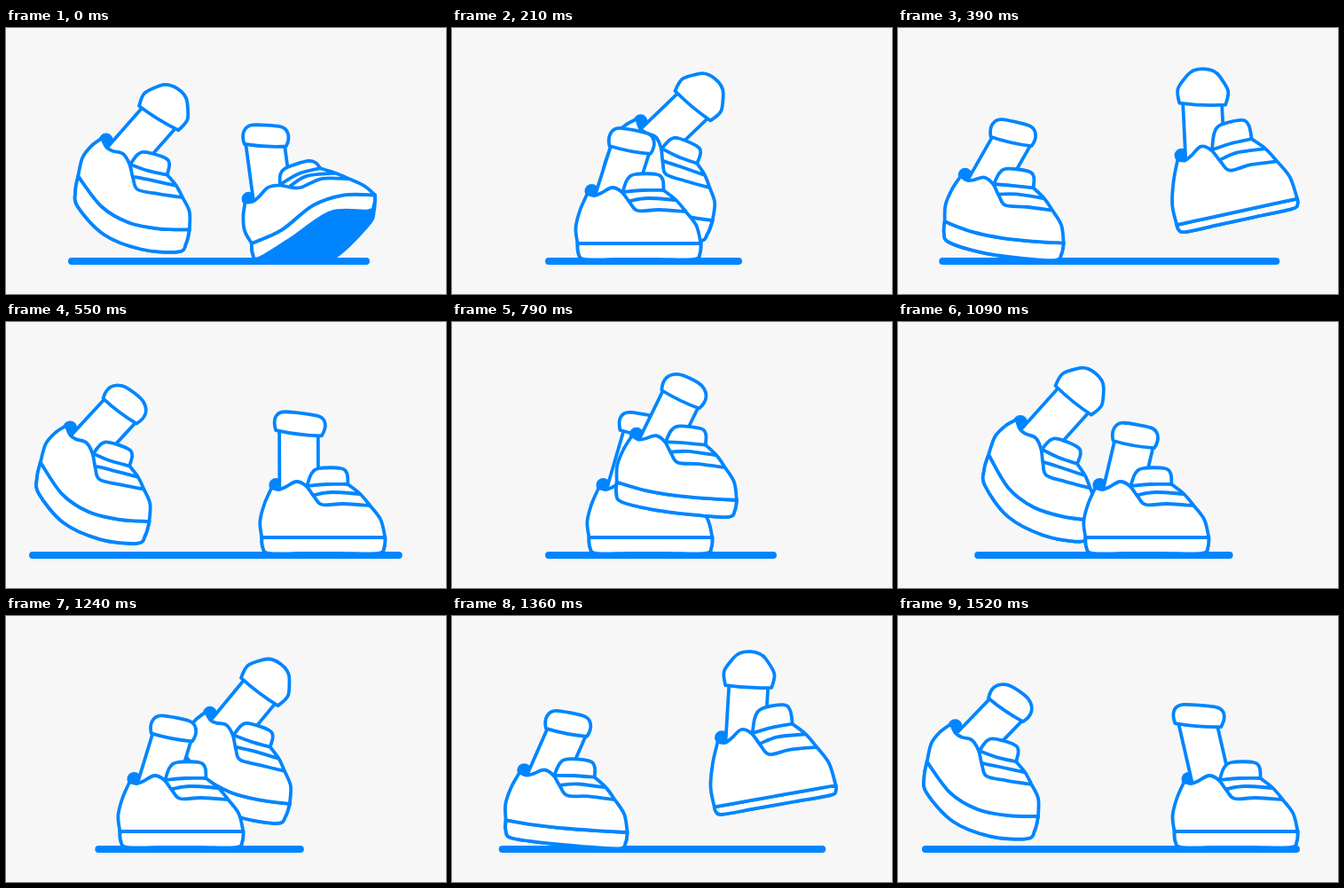
An HTML page that plays this animation: 496 by 300 pixels, repeating every 1.55 s.

```html
<!DOCTYPE html>
<html lang="en">
<head>
<meta charset="utf-8">
<title>Walking shoes</title>
<style>
html, body { margin: 0; width: 100%; height: 100%; overflow: hidden; background: #f7f7f7; }
svg { display: block; width: 100%; height: 100%; }
</style>
</head>
<body>
<svg id="stage" viewBox="0 0 496 300" fill="none" stroke="#0085ff" stroke-width="3.8" stroke-linecap="round" stroke-linejoin="round"></svg>
<script>
const LOOP = 1550, CYCLE = 1000, INK = '#0085ff';
const LENGTH = 140, SOLE = 18, LEG = 44;
const svg = document.getElementById('stage');

const mix = (a, b, k) => a + (b - a) * k;
const ramp = (x, a, b) => {
  const k = Math.min(1, Math.max(0, (x - a) / (b - a)));
  return k * k * (3 - 2 * k);
};

// One flat shoe, heel at the left, ground at y = 0.
const SHOE = {
  heel: [[1, -18], [-1, -36], [4, -56], [12, -74]],
  collar: [[12, -74], [20, -72], [28, -75], [40, -81], [51, -76]],
  throat: [[51, -76], [60, -64], [69, -55], [93, -56], [123, -54]],
  lace: [[60, -66], [80, -69], [112, -67]],
  vamp: [[51, -76], [74, -78], [98, -78]],
  toe: [[98, -78], [112, -67], [123, -54], [135, -38], [140, -18]],
  tongue: [[52, -76], [57, -90], [66, -96], [90, -96], [97, -90], [98, -78]],
  seam: [[1, -18], [35, -18], [70, -18], [105, -18], [140, -18]],
  edge: [[2, -7], [9, 0], [45, 0], [90, 0], [132, 0], [139, -7]],
  ankle: [[17, -77], [21, -73]]
};

// Toe x, y, tilt, then cuff x, y, tilt, over one stride.
const GAIT = [
  [0, 416, 243, 0, 269, 131, 3],
  [30, 395, 243, 0, 262, 130, 5],
  [90, 351, 243, 0, 243, 134, 10],
  [210, 281, 243, 0, 178, 133, 11],
  [290, 246, 243, 0, 142, 131, 11],
  [360, 198, 244, 3, 106, 127, 11],
  [520, 158, 226, 0, 102, 93, 34],
  [590, 172, 224, 6, 129, 81, 39],
  [710, 245, 217, 7, 203, 80, 40],
  [790, 320, 201, 3, 236, 77, 26],
  [860, 384, 191, -10, 260, 87, 3],
  [940, 418, 200, -14, 278, 107, 2]
];
const GROUND = [
  [0, 74, 406], [90, 90, 374], [210, 109, 323], [360, 57, 417],
  [520, 31, 449], [550, 30, 443], [790, 109, 362]
];

// Monotone cubic through cyclic keys.
function sample(keys, t) {
  const n = keys.length;
  const at = (j, c) => keys[(j + n) % n][c] + (c ? 0 : Math.floor(j / n) * CYCLE);
  let i = n - 1;
  while (keys[i][0] > t) i--;
  const span = at(i + 1, 0) - at(i, 0), k = (t - at(i, 0)) / span;
  const ease = k * k * (3 - 2 * k);
  return keys[0].slice(1).map((_, m) => {
    const c = m + 1;
    const slope = j => (at(j + 1, c) - at(j, c)) / (at(j + 1, 0) - at(j, 0));
    const tangent = j => {
      const a = slope(j - 1), b = slope(j);
      return a * b > 0 ? 2 * a * b / (a + b) : 0;
    };
    return mix(at(i, c), at(i + 1, c), ease)
      + span * k * (1 - k) * ((1 - k) * tangent(i) - k * tangent(i + 1));
  });
}

// Moves from local to stage coordinates.
function frame(x, y, deg) {
  const c = Math.cos(deg * Math.PI / 180), s = Math.sin(deg * Math.PI / 180);
  return (u, v) => [x + u * c - v * s, y + u * s + v * c];
}

// bend: heel peels up; roll: toe lifts and shows the tread; tall: upper stretches.
function warp([u, v], { bend, roll, tall }, under) {
  const h = -v - SOLE, up = Math.max(h, 0), down = Math.max(-h, 0);
  const k = 1 - u / LENGTH, k3 = k * k * k;
  const front = ramp(u, 0, 100), rise = under ? ramp(u, 100, 150) : front;
  return [
    u + bend * (.25 * h * (1 + .4 * k) + 14 * k3) + up * (.1 * tall - .33 * roll),
    v - bend * (63 * k3 - .4 * down)
      - roll * (55 * rise - up * (.2 + .3 * front))
      - tall * (.28 * up + .45 * down)
  ];
}

const fmt = p => p[0].toFixed(2) + ' ' + p[1].toFixed(2);
const poly = pts => 'M' + pts.map(fmt).join('L');

// Smooth curve through points; with join it continues the path before it.
function curve(pts, join) {
  let d = (join ? 'L' : 'M') + fmt(pts[0]);
  for (let i = 0; i < pts.length - 1; i++) {
    const a = pts[i - 1] || pts[i], b = pts[i], c = pts[i + 1], e = pts[i + 2] || c;
    d += 'C' + fmt([b[0] + (c[0] - a[0]) / 6, b[1] + (c[1] - a[1]) / 6]) + ' '
      + fmt([c[0] - (e[0] - b[0]) / 6, c[1] - (e[1] - b[1]) / 6]) + ' ' + fmt(c);
  }
  return d;
}
const chain = (...parts) => parts.map((pts, i) => curve(pts, i > 0)).join('') + 'Z';

function add(attrs) {
  const el = document.createElementNS('http://www.w3.org/2000/svg', 'path');
  for (const name in attrs) el.setAttribute(name, attrs[name]);
  svg.appendChild(el);
  return d => el.setAttribute('d', d);
}

function cuffPath(put, w, h) {
  const bulge = (h - 21) * .9, corner = 8, dx = w * .3 - corner;
  const cubic = (...n) => 'C' + [0, 2, 4].map(i => fmt(put(n[i], n[i + 1]))).join(' ');
  const side = -h + 1.5 * bulge;
  return 'M' + fmt(put(0, 0))
    + cubic(-5, -h * .5, corner - 1.5 * dx, side, corner, -h)
    + cubic(w * .3, -h - bulge, w * .7, -h - bulge, w - corner, -h)
    + cubic(w - corner + 1.5 * dx, side, w + 5, -h * .5, w, 0)
    + cubic(w * .7, 1.5, w * .3, 1.5, 0, 0) + 'Z';
}

function makeFoot(far) {
  const white = { fill: '#fff' }, bare = { fill: '#fff', stroke: 'none' };
  const tab = add({ 'stroke-width': 16 });
  const legFill = add(bare), leg = add({}), cuff = add(white), tongue = add(white);
  const tread = add({ fill: INK }), sole = add(white);
  const body = add(bare), lines = add({});
  const width = far ? 52 : 47, height = far ? 32 : 24;

  return time => {
    const t = (time + far * CYCLE / 2) % CYCLE;
    const [x, y, tilt, cx, cy, lean] = sample(GAIT, t);
    const swing = ramp(t, 400, 500) - ramp(t, 900, 1000);
    const pose = {
      bend: ramp(t, 320, 520) - ramp(t, 700, 830),
      roll: 1 - ramp(t, 0, 20) + ramp(t, 890, 980),
      tall: ramp(t, 790, 860) - ramp(t, 890, 980)
    };
    const onShoe = frame(x + far * 48, y, tilt);
    const place = (pts, under) => pts.map(p => {
      const [u, v] = warp(p, pose, under);
      return onShoe(u - LENGTH, v + SOLE);
    });
    const s = {};
    for (const part in SHOE) s[part] = place(SHOE[part]);
    const under = place(SHOE.edge, true);
    const back = s.seam.slice().reverse();
    const base = edge => [s.seam[0], ...edge, back[0]];

    const onCuff = frame(cx + far * 48, cy - far * 9, lean);
    const inset = (width - LEG) / 2;
    const left = onCuff(inset, 0), right = onCuff(width - inset, 0);
    const [knob, ankle] = s.ankle;
    const shin = right.map((r, i) => r + (ankle[i] - left[i]) * .65);

    tab(poly([knob, knob]));
    legFill(poly([left, ankle, s.throat[1], shin, right]) + 'Z');
    leg(poly([left, ankle]) + poly([right, shin]));
    cuff(cuffPath(onCuff, width, mix(22, height, swing)));
    tongue(curve(s.tongue));
    tread(chain(base(under), back));
    sole(chain(base(s.edge), back));
    body(chain(s.heel, s.collar, s.vamp, s.toe, back));
    lines([s.heel, s.collar.concat(s.throat.slice(1)), s.lace, s.vamp, s.toe, s.seam]
      .map(pts => curve(pts)).join(''));
  };
}

const ground = add({ 'stroke-width': 8 });
const feet = [makeFoot(1), makeFoot(0)];

function draw(ms) {
  const t = ms % LOOP % CYCLE;
  const [a, b] = sample(GROUND, t);
  ground(poly([[a, 263], [b, 263]]));
  feet.forEach(foot => foot(t));
}

const start = performance.now();
function tick() {
  draw(performance.now() - start);
  requestAnimationFrame(tick);
}
tick();
</script>
</body>
</html>
```
